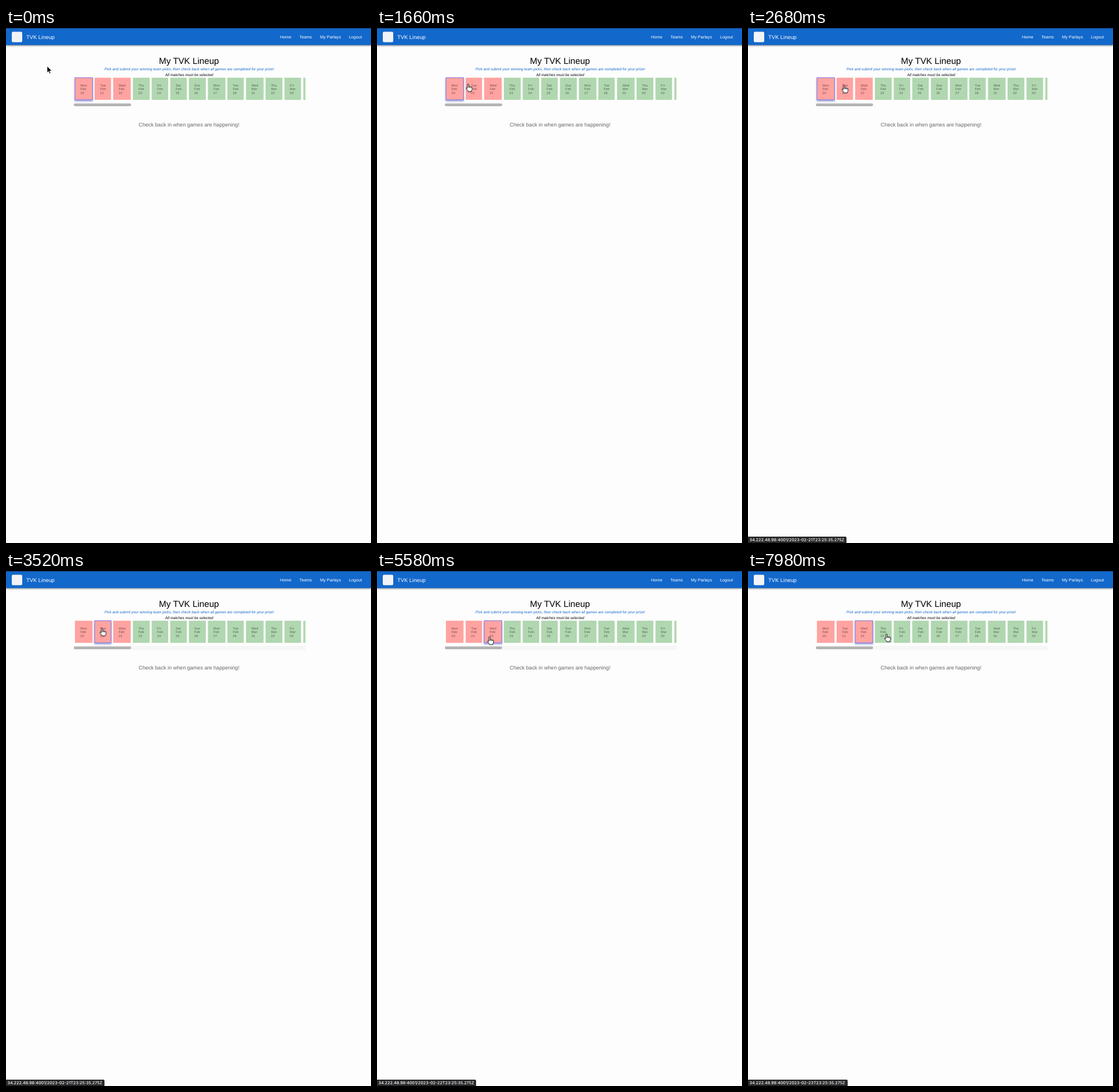
Animation, 630 px wide and 889 px high, one loop 8 s. Source, as an HTML page:

```html
<!DOCTYPE html>
<html lang="en">
<head>
<meta charset="utf-8">
<title>TVK Lineup</title>
<style>
  html, body { margin: 0; width: 100%; height: 100%; overflow: hidden; background: #fdfdfd; }
  svg { position: absolute; left: 0; top: 0; display: block; }
  text { font-family: "Liberation Sans", Arial, sans-serif; text-rendering: geometricPrecision; }
  .mid { text-anchor: middle; }
  .nav { font-size: 7.25px; fill: #fff; letter-spacing: .03px; }
  .note { font-size: 6.36px; font-style: italic; }
  .date { font-size: 5.5px; letter-spacing: .18px; fill: #000; fill-opacity: .56; }
  .bar { filter: drop-shadow(0 1px 1.5px rgba(0, 0, 0, .5)); }
  .picked { fill: #ffa3a1; stroke: #7a7ae6; filter: drop-shadow(0 2px 1.8px rgba(70, 80, 190, .55)); }

  .status {
    position: absolute; left: 0; bottom: 0; height: 11px; padding: 0 4px 0 2.5px;
    box-sizing: border-box; border-radius: 0 2px 0 0; background: #29292b; color: #fff;
    font: 500 7.15px/12px Inter, sans-serif; white-space: nowrap; text-rendering: geometricPrecision;
  }

  .picked, .status, .arrow, .hand, .track { animation: 8s step-end infinite; }
  .p0 { animation-name: pick-mon; }
  .p1 { animation-name: pick-tue; }
  .p2 { animation-name: pick-wed; }
  .track { animation-name: track; }
  .s0 { animation-name: link-tue; }
  .s1 { animation-name: link-wed; }
  .s2 { animation-name: link-thu; }
  .arrow { animation-name: arrow; }
  .hand { animation-name: hand; }
  .cursor { animation: travel 8s ease-in-out infinite; }

  @keyframes pick-mon { 0% { opacity: 1 } 43.75%, 100% { opacity: 0 } }
  @keyframes pick-tue { 0% { opacity: 0 } 43.75% { opacity: 1 } 63.75%, 100% { opacity: 0 } }
  @keyframes pick-wed { 0% { opacity: 0 } 63.75%, 100% { opacity: 1 } }
  @keyframes track { 0% { opacity: 0 } 43.75%, 100% { opacity: 1 } }
  @keyframes link-tue { 0% { opacity: 0 } 32.25% { opacity: 1 } 53%, 100% { opacity: 0 } }
  @keyframes link-wed { 0% { opacity: 0 } 53% { opacity: 1 } 73.75%, 100% { opacity: 0 } }
  @keyframes link-thu { 0% { opacity: 0 } 73.75%, 100% { opacity: 1 } }
  @keyframes arrow { 0% { opacity: 1 } 14.2%, 100% { opacity: 0 } }
  @keyframes hand { 0% { opacity: 0 } 14.2%, 100% { opacity: 1 } }
  @keyframes travel {
    0% { transform: translate(71px, 66px) }
    12.5% { transform: translate(115px, 83px) }
    20.75% { transform: translate(157px, 96.5px) }
    33.5%, 51% { transform: translate(165.5px, 99px) }
    54%, 71.25% { transform: translate(194px, 114px) }
    76.25%, 80.75% { transform: translate(235.5px, 110px) }
    99.75%, 100% { transform: translate(239px, 109px) }
  }
</style>
</head>
<body>
<svg width="630" height="889" viewBox="0 0 630 889">
  <rect class="bar" width="630" height="29.5" fill="#1268cb"/>
  <rect width="630" height="1" fill="#173a63"/>
  <rect x="10" y="6.5" width="18" height="18" rx="2" fill="#f1f3f7"/>
  <text x="35" y="18.6" font-size="9.3" fill="#fff" letter-spacing=".05">TVK Lineup</text>
  <text class="nav" x="473" y="18">Home</text>
  <text class="nav" x="506.5" y="18">Teams</text>
  <text class="nav" x="542" y="18">My Parlays</text>
  <text class="nav" x="592" y="18">Logout</text>

  <text class="mid" x="315.8" y="62" font-size="15.2">My TVK Lineup</text>
  <text class="mid note" x="316.3" y="73.2" fill="#1268cb">Pick and submit your winning team picks, then check back when all games are completed for your prize!</text>
  <text class="mid note" x="316.2" y="83.2">All matches must be selected</text>

  <g id="cards"></g>
  <rect class="track" x="117" y="129" width="400" height="7" fill="#f6f6f6"/>
  <rect x="117" y="130.2" width="99" height="4.8" rx="2.4" fill="#b3b3b3"/>
  <text class="mid" x="316" y="170" font-size="9.07" fill="#666">Check back in when games are happening!</text>
</svg>

<div class="status s0">34.222.48.98:4001/2023-02-21T23:25:35.275Z</div>
<div class="status s1">34.222.48.98:4001/2023-02-22T23:25:35.275Z</div>
<div class="status s2">34.222.48.98:4001/2023-02-23T23:25:35.275Z</div>

<svg width="630" height="889" viewBox="0 0 630 889">
  <g class="cursor">
    <path class="arrow" d="M0 0V11.2L2.6 8.8L4.4 12.9L6.2 12.1L4.5 8.1H8Z" fill="#000" stroke="#fff" stroke-width=".7"/>
    <path class="hand" fill="#fff" stroke="#000" stroke-width=".9" stroke-linejoin="round"
      d="M-1 7.5V.8Q-1-.4 .1-.4T1.2 .8V4.6Q2.4 3.6 3.3 4.8Q4.6 4 5.4 5.3Q7 4.8 7.2 6.5V9Q7 10.5 6 11.5V13H.3Q.2 11.8-1.6 10Q-3.6 7.8-3.2 7Q-2.4 6-1 7.5ZM1.2 4.6V6.6M3.3 4.8V6.8M5.4 5.3V7"/>
  </g>
</svg>

<script>
  const cardGroup = document.getElementById('cards');
  const lefts = [119, 153, 185, 219, 251.5, 283.5, 315.7, 348.5, 382, 414.3, 448, 480.7];
  const widths = { Mon: 30.3, Tue: 28.3, Wed: 30.3, Thu: 29, Fri: 28.5, Sat: 28.5, Sun: 29.2 };
  const dayNames = Object.keys(widths);
  const pink = '#ffa3a1', green = '#b0d7b0';

  const box = (x, width, attrs) =>
    `<rect x="${x}" y="85.8" width="${width}" height="38.2" ${attrs}/>`;

  const card = (x, i) => {
    const day = dayNames[i % 7];
    const date = new Date(Date.UTC(2023, 1, 20 + i));
    const month = date.getUTCMonth() === 1 ? 'Feb' : 'Mar';
    const number = String(date.getUTCDate()).padStart(2, '0');
    const lines = [day, month, number].map((line, row) =>
      `<text class="date" x="${x + 9.4}" y="${100.6 + row * 6.5}">${line}</text>`).join('');
    const past = i < 3;
    const picked = past ? box(x, widths[day], `class="picked p${i}"`) : '';
    return box(x, widths[day], `fill="${past ? pink : green}"`) + picked + lines;
  };

  cardGroup.innerHTML = lefts.map(card).join('') + box(513.2, 3.6, `fill="${green}"`);
</script>
</body>
</html>
```
